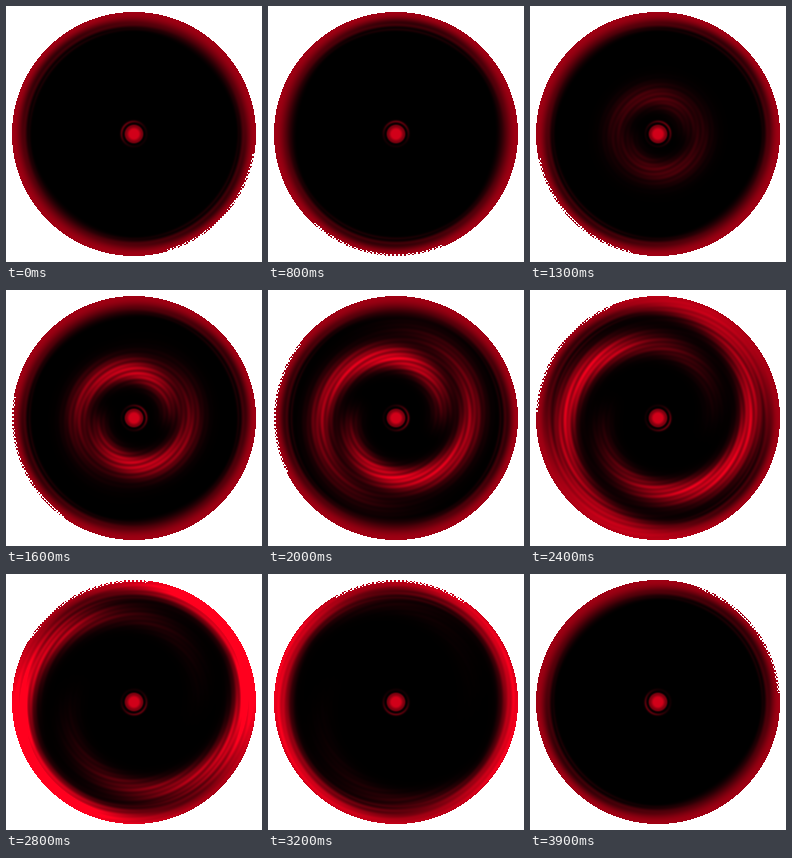
An HTML page with a canvas that plays this animation: 256 px wide and 256 px high, repeating every 4 s.

```html
<!DOCTYPE html>
<html lang="en">
<head>
<meta charset="utf-8">
<title>Spiral pulse</title>
<style>
  html, body { margin: 0; height: 100%; overflow: hidden; background: #fff; }
  canvas { display: block; width: 256px; height: 256px; }
</style>
</head>
<body>
<canvas id="stage" width="256" height="256"></canvas>
<script>
const SIZE = 256, MID = 128, RADIUS = 122, LOOP = 4000, STEP = 100;
const ctx = document.getElementById('stage').getContext('2d');
const image = ctx.createImageData(SIZE, SIZE);

const smooth = (a, b, x) => {
  const k = Math.min(1, Math.max(0, (x - a) / (b - a)));
  return k * k * (3 - 2 * k);
};
const bell = (d, width) => Math.exp(-d * d / (2 * width * width));

// One arm, unwinding counterclockwise from its start angle and growing outwards.
function arm(r, angle, start, t) {
  const age = t - 1.6;
  const turn = ((start - angle + 40 + 720) % 360) - 40;
  const path = Math.min(116, 36 + 22 * age + (0.11 + 0.125 * age) * turn);
  const off = r - path;
  if (Math.abs(off) > 34) return 0;
  const peak = 95 + 80 * smooth(2, 2.8, t);
  const spread = turn < peak ? 55 + 15 * smooth(2, 2.8, t) : 70 + 30 * smooth(1.6, 2.2, t);
  const ends = smooth(-40, 10, turn) * (1 - smooth(230, 320, turn));
  const dim = start === 0 && turn < 140 ? 1 - 0.5 * smooth(2, 2.5, t) * (1 - smooth(90, 140, turn)) : 1;
  return bell(off, off < 0 ? 7 : 9.5) * bell(turn - peak, spread) * ends * dim;
}

function rim(r, axis) {
  const broad = 0.5 - 0.5 * Math.cos(2 * axis);
  const glow = 0.62 * smooth(107 - 9 * broad, 121, r);
  const lines = (1 - broad) * (0.2 * bell(r - 109, 1.4) + 0.1 * bell(r - 104.5, 1));
  return glow + lines;
}

function hub(r, axis) {
  const core = 0.5 * (1 - smooth(8, 10.5, r)) + 0.32 * (1 - smooth(4, 8, r));
  const arc = 0.06 + 0.3 * ((1 - Math.cos(axis)) / 2) ** 2;
  return core + arc * bell(r - 12.5, 0.9);
}

function draw(t) {
  const sweep = (42 + 72 * t) * Math.PI / 180;
  const pulse = smooth(1, 1.75, t) * (1 - smooth(2.7, 3.6, t));
  for (let y = 0, i = 0; y < SIZE; y++) {
    for (let x = 0; x < SIZE; x++, i += 4) {
      const dx = x + 0.5 - MID, dy = y + 0.5 - MID;
      const r = Math.hypot(dx, dy), a = Math.atan2(dy, dx), axis = a - sweep;
      const toothed = Math.cos(axis) > 0.84 && r > 120 && ((x >> 1) + (y >> 1)) % 2;
      let red = 255, green = 255, blue = 255;
      if (r < RADIUS && !toothed) {
        let v = 0;
        if (r < 18) v += hub(r, axis);
        if (r > 95) v += rim(r, axis);
        if (pulse && r > 15) {
          const deg = a * 180 / Math.PI;
          const streak = 0.9 + 0.12 * Math.sin(r * 1.3 + 3 * Math.sin(2 * a))
                             + 0.1 * Math.sin(r * 0.7 - 2 * a);
          v += 0.88 * pulse * streak * (arm(r, deg, 0, t) + arm(r, deg, 180, t));
        }
        v = Math.min(1, v);
        red = 255 * v;
        green = 0;
        blue = 30 * v;
      }
      image.data[i] = red;
      image.data[i + 1] = green;
      image.data[i + 2] = blue;
      image.data[i + 3] = 255;
    }
  }
  ctx.putImageData(image, 0, 0);
}

const begin = performance.now();
let shown = -1;
function tick() {
  const step = Math.floor((performance.now() - begin) % LOOP / STEP);
  if (step !== shown) draw((shown = step) * STEP / 1000);
  requestAnimationFrame(tick);
}
tick();
</script>
</body>
</html>
```
